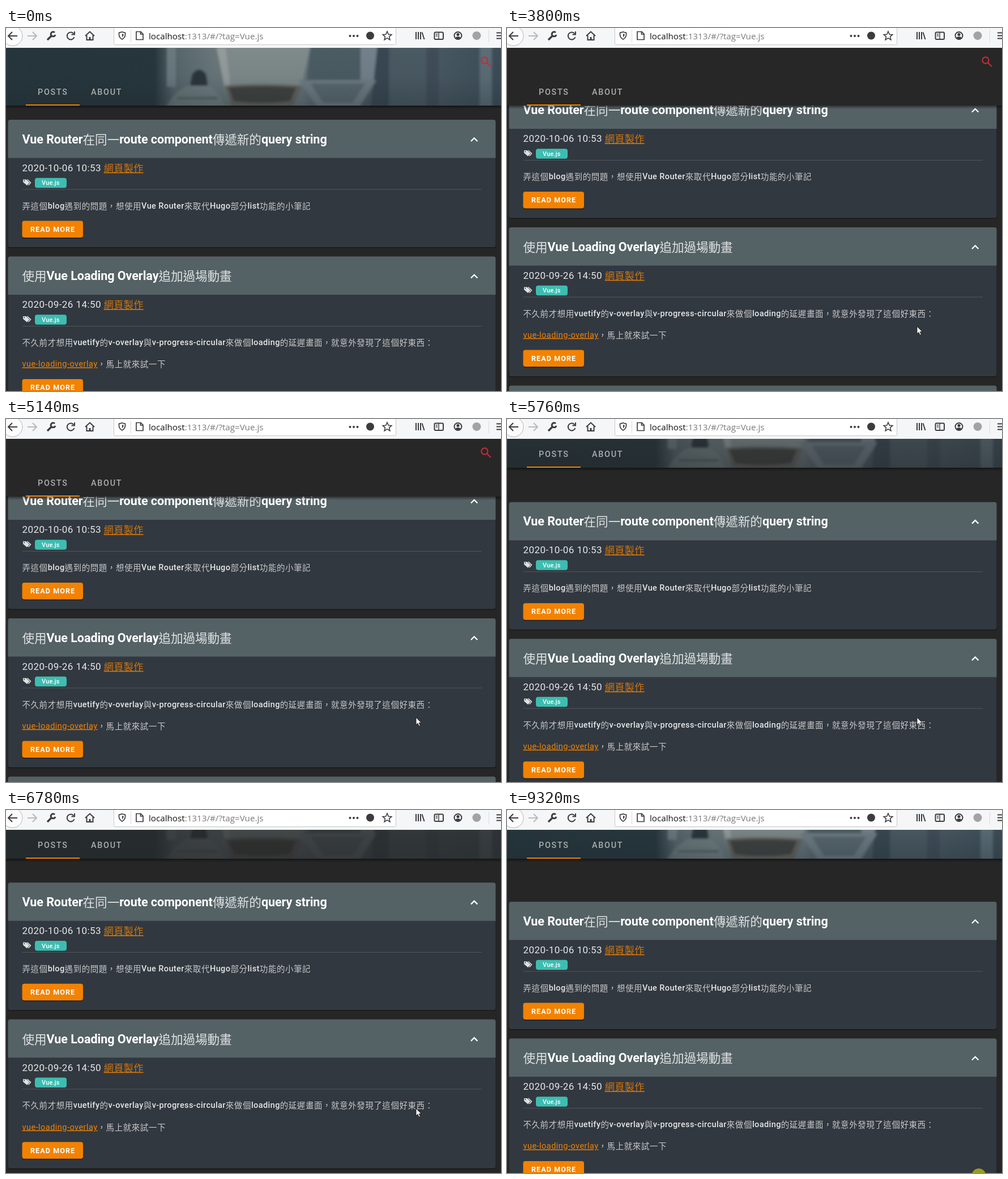
An HTML page for the animation above (9.44 s loop, 874 by 641 pixels).

```html
<!DOCTYPE html>
<html lang="zh-Hant">
<head>
<meta charset="utf-8">
<title>Blog posts</title>
<style>
  html, body { margin: 0; width: 100%; height: 100%; overflow: hidden; background: #262626; }
  svg { display: block; width: 874px; height: 641px; }
  text { font-family: Roboto, 'Noto Sans CJK TC', 'Noto Sans CJK', sans-serif; fill: #e6e7e8; white-space: pre; }
  .cjk {
    font-family: 'Noto Sans CJK TC Light', 'Noto Sans CJK TC', 'Noto Sans CJK', sans-serif;
    font-weight: 200; fill-opacity: .82; baseline-shift: -.04em;
  }
  .title { font-size: 21.6px; font-weight: 600; letter-spacing: -.08px; fill: #fff; }
  .date { font-size: 17.1px; letter-spacing: .4px; }
  .body { font-size: 14.5px; font-weight: 500; letter-spacing: .4px; }
  .body .cjk { letter-spacing: .55px; }
  .link { fill: #f38200; text-decoration: underline; }
  .plain { font-weight: 400; letter-spacing: .47px; }
  .btn { font-size: 12.6px; font-weight: 600; letter-spacing: 1.05px; fill: #fff; }
  .tag { font-size: 11px; font-weight: 500; letter-spacing: .2px; fill: #fff; }
  .tab { font-size: 14.4px; font-weight: 500; letter-spacing: 1.7px; fill: #acaeae; }
  .url { font-family: 'Open Sans', 'Noto Sans', sans-serif; font-size: 15.2px; fill: #7a7a7c; }
  .icon { fill: none; stroke: #3c3c40; stroke-width: 2; }
</style>
</head>
<body>
<svg viewBox="0 0 874 641" xmlns="http://www.w3.org/2000/svg">
  <defs>
    <linearGradient id="wall">
      <stop offset="0" stop-color="#26353c"/><stop offset=".3" stop-color="#27363d"/>
      <stop offset=".34" stop-color="#55656b"/><stop offset=".42" stop-color="#69777b"/>
      <stop offset=".6" stop-color="#66747a"/><stop offset=".65" stop-color="#4a5961"/>
      <stop offset=".85" stop-color="#4a5a63"/><stop offset="1" stop-color="#3c4c56"/>
    </linearGradient>
    <linearGradient id="shade" x2="0" y2="1">
      <stop offset="0" stop-color="#1c262c" stop-opacity="0"/>
      <stop offset=".5" stop-color="#1c262c" stop-opacity=".06"/>
      <stop offset="1" stop-color="#1c262c" stop-opacity=".3"/>
    </linearGradient>
    <linearGradient id="drop" x2="0" y2="1">
      <stop offset="0" stop-opacity=".45"/><stop offset="1" stop-opacity="0"/>
    </linearGradient>
    <filter id="soft" x="-5%" y="-5%" width="110%" height="110%"><feGaussianBlur stdDeviation="2"/></filter>
    <clipPath id="bar"><rect y="35" width="874" height="102"/></clipPath>
  </defs>

  <rect width="874" height="641" fill="#262626"/>
  <g id="page"></g>

  <g id="header">
    <rect y="137" width="874" height="6" fill="url(#drop)"/>
    <rect y="35" width="874" height="102" fill="#272727"/>
    <g id="photo" clip-path="url(#bar)">
      <rect y="35" width="874" height="102" fill="url(#wall)"/>
      <g filter="url(#soft)">
        <path d="M284 30H300V104H284Z" fill="#6a797f"/>
        <path d="M282 140Q300 108 326 100H354Q378 112 386 140Z" fill="#7c8989" opacity=".5"/>
        <path d="M325 102L329 82Q341 66 353 82L356 102Z" fill="#29353b"/>
        <path d="M302 122H374V126H302Z" fill="#4f5e63"/>
        <path d="M371 30H538L522 102L506 140H398L385 104Z" fill="#7f8a8b"/>
        <path d="M372 36L386 104L396 100L388 36Z" fill="#949d9c"/>
        <path d="M386 102Q450 96 522 102L506 140H398Z" fill="#65645f"/>
        <path d="M393 105Q450 101 512 105L502 129Q450 136 402 129Z" fill="#41423f"/>
        <path d="M538 30H626V92H532Z" fill="#4c5b63"/>
        <path d="M626 30H656V92H626Z" fill="#72818a"/>
        <path d="M656 30H676V140H644Z" fill="#394751"/>
        <path d="M516 92H654L624 140H550Z" fill="#6f7e86"/>
        <path d="M538 98H634L612 132H560Z" fill="#5a6971"/>
        <path d="M742 30H764V140H742Z" fill="#3f4e58"/>
        <path d="M836 30H858V140H836Z" fill="#5b6d77"/>
      </g>
      <rect y="35" width="874" height="102" fill="url(#shade)"/>
    </g>
    <g fill="none" stroke="#c62b35" stroke-width="2.2"><circle cx="845" cy="57" r="5.6"/><path d="M849 61L856 68"/></g>
    <text class="tab" x="56" y="117.5">POSTS</text>
    <text class="tab" x="150" y="117.5">ABOUT</text>
    <rect x="35" y="135" width="95" height="2" fill="#f38200"/>
  </g>

  <g id="browser">
    <rect width="874" height="35" fill="#f5f6f7"/>
    <rect x="190.5" y="-6" width="498" height="35.5" rx="2" fill="#fff" stroke="#c8c8ca"/>
    <circle cx="11.5" cy="14" r="17.5" fill="#fcfcfc" stroke="#b4b4b6"/>
    <g class="icon">
      <path d="M20 14H4M11 7L4 14L11 21"/>
      <path d="M38 14H54M47 7L54 14L47 21" stroke="#b9b9bb"/>
      <path d="M73 21L81 13" stroke-width="3.4"/>
      <path d="M86 8A4 4 0 1 0 87 12" stroke-width="3"/>
      <path d="M119.500 10A6.500 6.500 0 1 0 120.500 16M121 6V11.500H115.500"/>
      <path d="M140 14L148 6.500L156 14M142.500 13V21H153.500V13"/>
      <path d="M148 21V16" stroke-width="3"/>
      <path d="M205 7L210.500 8.500V12Q210 17.500 205 20Q200 17.500 199.500 12V8.500Z" stroke-width="1.7"/>
      <path d="M205 10V16.500Q207.500 15 207.800 11Z" fill="#3c3c40" stroke="none"/>
      <path d="M220.500 3V25" stroke="#d8d8da" stroke-width="1"/>
      <path d="M230 6.500H238L242 10.500V20.500H230ZM237.500 6.500V11H242" stroke-width="1.7"/>
      <path d="M673 6L675.300 11.200L680.800 11.700L676.600 15.400L677.900 20.800L673 17.900L668.100 20.800L669.400 15.400L665.200 11.700L670.700 11.200Z" stroke-width="1.6"/>
      <path d="M724 7V20M728 7V20M732 7V20M734.500 7.500L738.500 20"/>
      <rect x="756.500" y="7.500" width="15.500" height="12.500" rx="2"/>
      <path d="M764 8V20M759 11H762M759 14H762" stroke-width="1.4"/>
      <circle cx="798" cy="13.500" r="6.500"/>
      <path d="M852.500 3V25" stroke="#dcdcde" stroke-width="1"/>
      <path d="M866 8.500H876M866 13.500H876M866 18.500H876"/>
    </g>
    <g fill="#3c3c40">
      <circle cx="607.500" cy="14" r="2"/><circle cx="614" cy="14" r="2"/><circle cx="620.500" cy="14" r="2"/>
      <circle cx="643" cy="13.500" r="7"/>
      <circle cx="798" cy="11.500" r="2.600"/><path d="M793 17Q798 13 803 17L798 20Z"/>
      <circle cx="831" cy="13.500" r="7.500" fill="#a3a3a5"/>
    </g>
    <text class="url" x="252" y="19.500"><tspan fill="#141416">localhost</tspan>:1313/#/?tag=Vue.js</text>
  </g>

  <circle id="click" r="12.500" fill="#ff0" fill-opacity=".5"/>
  <path id="cursor" d="M0 0V13L3 10.300L5.200 15.200L7.400 14.200L5.200 9.500H9.200Z" fill="#fff" stroke="#111" stroke-width=".8"/>
</svg>

<script>
const $ = id => document.getElementById(id);
const LOOP = 9440, PEAK = 57, BAR_SHIFT = 51;

// Thin strokes for Chinese runs, the normal face for the rest
const mixed = s => s.replace(/[\u3000-\u9fff\uff00-\uffef]+/g, r => `<tspan class="cjk">${r}</tspan>`);
const text = (cls, x, y, s) => `<text class="${cls}" x="${x}" y="${y}">${mixed(s)}</text>`;

const button = y => `
  <rect x="28.5" y="${y + 1.5}" width="107.5" height="30" rx="4" fill="#000" opacity=".3"/>
  <rect x="28.5" y="${y}" width="107.5" height="29.5" rx="4" fill="#f38200"/>
  ${text('btn', 43, y + 19.3, 'READ MORE')}`;

const frame = (y, h) => `
  <rect x="3" y="${y + 1.5}" width="862" height="${h}" rx="4" fill="#000" opacity=".35"/>
  <rect x="3.5" y="${y}" width="861" height="${h}" rx="4" fill="#32383f"/>
  <path d="M3.5 ${y + 67.5}V${y + 4}q0-4 4-4H860.500q4 0 4 4V${y + 67.5}Z" fill="#546165"/>`;

const card = (y, h, title, date, content) => `${frame(y, h)}
  <g transform="translate(0 ${y})">
    ${text('title', 28.5, 41.7, title)}
    <path d="M821 38L826.700 32.300L832.400 38" fill="none" stroke="#fff" stroke-width="2.3"/>
    <text class="date" x="28.5" y="90.7">${date} <tspan class="link cjk">網頁製作</tspan></text>
    <path d="M30 105.500H35.500L41.500 111L37 116L30 110Z" fill="#dfe1e2"/>
    <path d="M37.500 105.500L43.500 111L39.500 115.500" fill="none" stroke="#dfe1e2" stroke-width="1.5"/>
    <circle cx="32.300" cy="107.700" r="1" fill="#32383f"/>
    <rect x="51" y="102.700" width="56" height="17.500" rx="4" fill="#3dbdb1"/>
    ${text('tag', 63, 115.3, 'Vue.js')}
    <path d="M28.500 123H840" stroke="#50565b"/>
    ${content}
  </g>`;

$('page').innerHTML =
  card(162, 225, 'Vue Router在同一route component傳遞新的query string', '2020-10-06 10:53',
    text('body', 28.5, 156.5, '弄這個blog遇到的問題，想使用Vue Router來取代Hugo部分list功能的小筆記') + button(178.5)) +
  card(403.5, 263, '使用Vue Loading Overlay追加過場動畫', '2020-09-26 14:50',
    text('body', 28.5, 156.5, '不久前才想用vuetify的v-overlay與v-progress-circular來做個loading的延遲畫面，就意外發現了這個好東西：') +
    `<text class="body" x="28.5" y="194.7"><tspan class="link plain">vue-loading-overlay</tspan>${mixed('，馬上就來試一下')}</text>` +
    button(216.5)) +
  frame(683, 225);

// Wheel moves: start, end, scroll offset reached
const wheel = [
  [3380, 3720, 51.5], [3820, 4120, 0],
  [4240, 4483, 51.5], [4620, 4860, 0],
  [4930, 5140, 51.5], [5145, 5220, PEAK],
  [5250, 5530, 0], [5720, 6002, PEAK],
  [6100, 6290, 0], [6480, 6670, PEAK],
  [6720, 6983, 0], [7120, 7320, PEAK], [7330, 7500, 0]
];

const clamp = v => Math.min(1, Math.max(0, v));
const easeOut = p => 1 - (1 - p) ** 2;
const easeInOut = p => p * p * (3 - 2 * p);
const mix = (a, b, p) => a + (b - a) * p;

const scrollAt = t => wheel.reduce((y, [from, to, end]) =>
  mix(y, end, easeOut(clamp((t - from) / (to - from)))), 0);

function cursorAt(t) {
  const rise = easeOut(clamp((t - 200) / 170));
  const leave = easeInOut(clamp((t - 8060) / 770));
  return [mix(mix(726, 724, rise), 829, leave), mix(mix(541, 527, rise), 638, leave)];
}

const move = (el, x, y) => el.setAttribute('transform', `translate(${x.toFixed(2)} ${y.toFixed(2)})`);
const show = (el, on) => el.setAttribute('visibility', on ? 'visible' : 'hidden');

function draw(t) {
  const scroll = scrollAt(t);
  const fold = easeInOut(clamp((t - 5145) / 190));
  move($('page'), 0, -scroll);
  move($('header'), 0, -BAR_SHIFT * fold);
  $('photo').setAttribute('opacity', clamp(1 - scroll / BAR_SHIFT).toFixed(3));

  move($('cursor'), ...cursorAt(t));
  show($('cursor'), t >= 200 && t < 9080);
  const late = t >= 9320;
  move($('click'), late ? 833 : 723.5, late ? 645.5 : 527);
  show($('click'), late || (t >= 3040 && t < 3200));
}

const start = performance.now();
function tick() {
  draw((performance.now() - start) % LOOP);
  requestAnimationFrame(tick);
}
tick();
</script>
</body>
</html>
```
